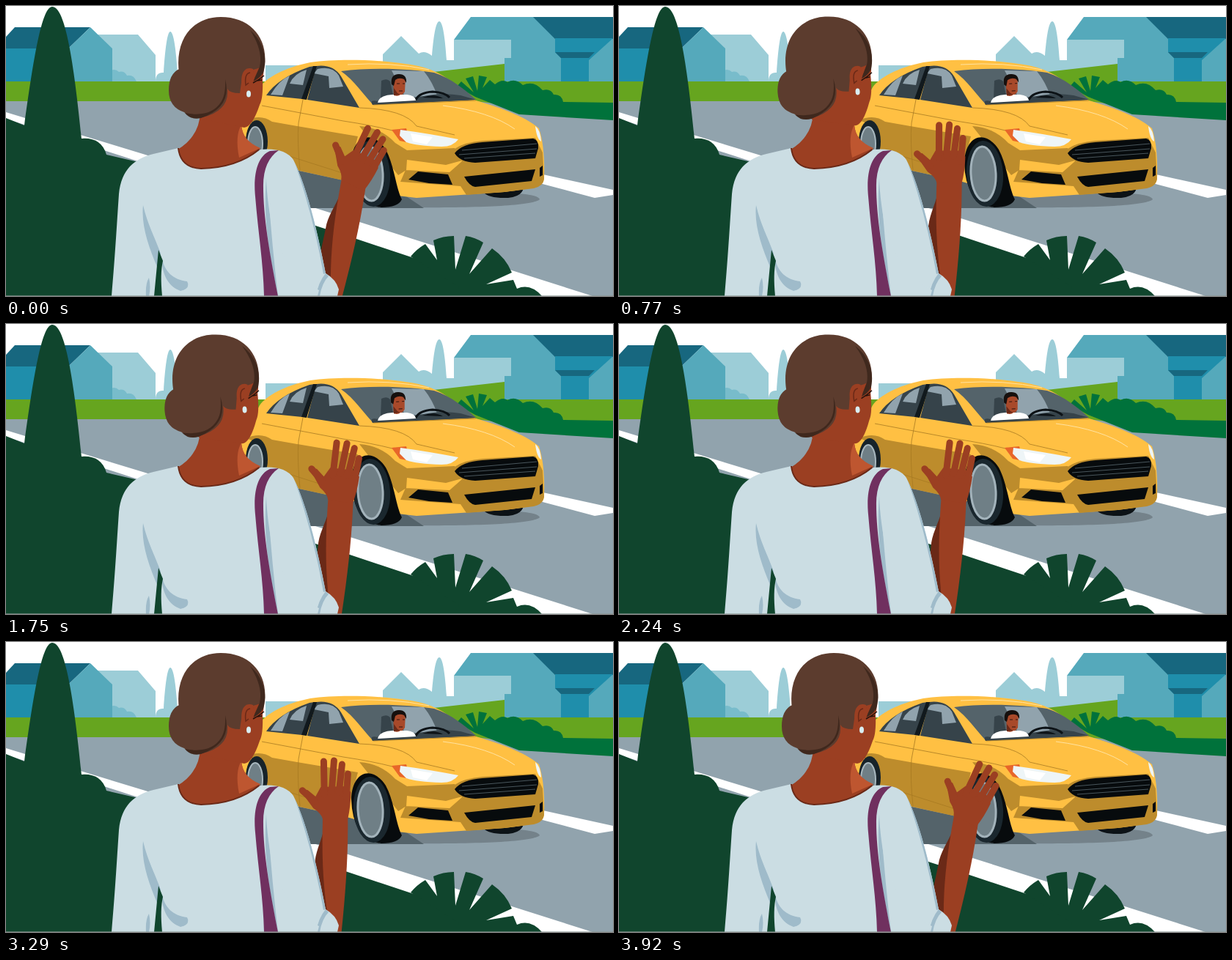
An HTML page for the animation above (3990 ms loop, 828 by 396 pixels).

```html
<!DOCTYPE html>
<html lang="en">
<head>
<meta charset="utf-8">
<title>Waving at a car</title>
<style>
html, body { margin: 0; width: 828px; height: 396px; overflow: hidden; background: #fff; }
svg { display: block; }
.pale { fill: #9ccdd7; } .blue { fill: #55a9bb; } .teal { fill: #1f8eab; } .navy { fill: #17677f; }
.lawn { fill: #66a51f; } .bush { fill: #00723b; } .dark { fill: #10452d; } .road { fill: #91a3ad; }
.car { fill: #ffc043; } .shade { fill: #bd8c2c; } .slate { fill: #54636a; } .ink { fill: #36434a; }
.skin { fill: #9b3f22; } .umber { fill: #6a2917; } .hair { fill: #5c3c2e; } .deep { fill: #3f281d; }
.cloth { fill: #cbdde3; } .fold { fill: #9fbbca; }
.line { fill: none; stroke: #a87a22; stroke-width: .8; }
.fingers { fill: none; stroke: #9b3f22; stroke-width: 9; stroke-linecap: round; stroke-linejoin: round; }
</style>
</head>
<body>
<svg width="828" height="396" viewBox="0 0 828 396">
  <g id="houses">
    <path class="pale" d="M115 39H180L204 67V103H140ZM204 103Q204 90 215 91C217 60 220 35 224 35C229 35 232 62 234 91Q245 92 246 103ZM354 81H425V105H354ZM514 92V66L539 41L563 65Q571 60 581 68C583 44 586 21 591 21C596 21 599 45 601 74H611V46H689V92Z"/>
    <path fill="#78bccb" d="M143 103V88Q149 85 154 90Q161 88 165 95Q174 93 178 103Z"/>
    <path class="teal" d="M0 58H90V103H0Z"/>
    <path class="navy" d="M0 42L12 29H115L85 58H0Z"/>
    <path class="blue" d="M115 29L145 58V103H85V58ZM634 15H720L750 44H828V103H680V71H689V46H611Z"/>
    <path class="navy" d="M719 15H828V45H749Z"/>
    <path class="teal" d="M749 44H828L795 74V103H757V71L749 63Z"/>
    <path class="navy" d="M749 63H803L795 71H757Z"/>
  </g>
  <path class="lawn" d="M0 103H500L566 92L680 79V103H828V140H0Z"/>
  <path class="road" d="M0 130H640L828 152V396H0Z"/>
  <path class="bush" d="M640 124L615 110L621 103L638 118L627 99L637 96L643 116L645 95L656 97L650 112L660 101L667 107Q677 99 684 104Q695 98 705 108Q720 101 732 115Q743 112 747 121Q758 120 760 131L828 132V156L700 148Z"/>
  <path fill="#fff" d="M728 229L828 251V258L803 262L728 242ZM0 145L190 203L416 274L800 396H690L416 300L180 212L0 154Z"/>
  <path class="dark" d="M0 153L25 163C39 60 50 1 63 1C79 1 91 60 103 181Q130 179 137 203L180 213L416 298L466 314L562 346L700 396H0Z"/>
  <path class="dark" d="M618 384L552 342Q560 332 572 325L588 347L583 320Q596 314 611 314L613 360L627 314Q640 316 651 323L632 366L663 331Q682 344 690 364L655 380L692 374L697 386Q715 378 731 396H610Z"/>

  <g id="car">
    <path fill="#74828a" d="M530 258L650 255Q725 254 728 264C720 273 640 276 540 275Z"/>
    <path class="slate" d="M395 224L470 240L540 256L570 276H412Z"/>
    <path fill="#0c1216" d="M650 252Q655 263 685 262Q705 260 706 247Z"/>
    <path class="car" d="M318 170C325 150 336 130 346 111C355 98 380 84 415 77C450 72 505 73 545 79C577 83 594 92 616 109L641 129C668 137 706 149 727 167C733 185 735 210 734 236C733 246 720 249 680 254L560 262L534 259L465 239L325 205Z"/>
    <path class="shade" d="M327 156Q348 147 363 158L397 164L480 178L464 239L400 225L354 200Q360 165 327 156ZM482 164Q512 166 531 187L547 197L612 194L622 211L600 217L547 210L546 224L535 231ZM612 195Q625 186 650 184L722 180L732 200L734 236Q733 246 720 249L680 254L628 258L620 246L538 240L545 224L605 227L622 212Z"/>
    <path class="ink" d="M355 122Q371 98 414 83L421 82L404 127ZM423 82Q446 79 457 96L482 139L411 128Z"/>
    <path class="road" d="M361 121Q373 101 387 95L377 122ZM387 106Q393 92 410 87L405 108ZM425 86Q445 81 454 95L460 110L441 112L440 96L420 92Z"/>
    <path fill="#11191d" d="M403 127L419 82H424L410 128Z"/>
    <path class="slate" d="M457 89C500 83 555 86 584 91C608 99 627 115 641 128L501 135C488 122 475 101 457 89Z"/>
    <path class="road" d="M526 88L570 89Q582 104 588 122L545 125Z"/>
    <path class="ink" d="M512 102Q520 98 524 103L528 122L511 127ZM500 135Q495 127 508 130L556 126Q590 117 620 122L641 128Z"/>
    <path d="M559 128Q564 118 582 117Q599 118 605 125" fill="none" stroke="#0c1216" stroke-width="3"/>
    <path fill="#0c1216" d="M568 125Q584 119 596 126Z"/>
    <path fill="#fff" d="M507 132Q509 122 527 121H547Q558 122 559 129Z"/>
    <g id="driver">
      <path fill="#a8492a" d="M528 98H545L544 117Q541 122 538 121Q535 124 529 122Z"/>
      <path class="umber" d="M529 112L534 119L538 121L529 122Z"/>
      <path fill="#16100e" d="M526 107Q524 93 536 93Q547 93 546 105L543 100Q536 97 531 101L529 109Z"/>
      <path d="M533 106h4m4 0h3M536 116h5" stroke="#32150e" fill="none"/>
    </g>
    <path class="line" d="M349 136L460 157Q500 163 527 170M405 128L399 160Q397 185 401 224M358 196L465 230M482 139Q544 141 560 164M501 135L641 129M560 164L612 176"/>
    <path d="M596 136Q660 144 694 168M466 80Q525 76 577 87" fill="none" stroke="#ffe3a1"/>
    <path fill="#e7662a" d="M526 169L546 167L551 187L537 184Z"/>
    <path fill="#eef5f7" d="M538 169Q575 174 617 182Q610 192 594 192Q560 191 546 186L537 177ZM722 164Q729 169 730 185Q724 182 722 164Z"/>
    <path fill="#fff" d="M552 174L582 179L574 189L555 185Z"/>
    <path fill="#070b0d" d="M612 201Q622 188 650 186L719 181Q727 183 726 194L722 208L640 214Q619 213 612 201ZM625 233L722 223L717 239L640 247Q632 246 625 233ZM549 237L562 226L603 230L609 244L577 242ZM728 221L732 218V231L728 233Z"/>
    <path d="M622 197L724 188M618 203L724 195M625 208L722 201" fill="none" stroke="#49565c"/>
    <ellipse cx="342" cy="185" rx="15" ry="29" fill="#17232a"/>
    <ellipse cx="340" cy="188" rx="10" ry="23" fill="#6f7f86" stroke="#a9b8bf" stroke-width="2"/>
    <path fill="#070b0d" d="M471 215C472 176 500 168 518 196C530 218 532 250 540 264Q535 275 512 275Q473 270 471 215Z"/>
    <ellipse cx="499" cy="229" rx="25" ry="45" fill="#1a272e" transform="rotate(-4 499 229)"/>
    <ellipse cx="497" cy="229" rx="17" ry="37" fill="#6f7f86" stroke="#a3b3bb" stroke-width="3" transform="rotate(-3 497 229)"/>
  </g>

  <g id="forearm">
    <path class="umber" d="M434 254C429 275 421 288 421 306L419 342L436 380L449 396L444 300Z"/>
    <path class="skin" d="M432 236H466C467 290 463 345 457 402H444C433 350 430 300 432 236Z"/>
    <g id="hand">
      <path class="skin" d="M432 242Q430 234 419 227L402 204L411 202L422 211L429 198L464 197L470 205Q470 225 466 242Z"/>
      <path class="fingers" d="M422 219L404 203M434 208L433 163M444 204L447 162M454 205L458 167M464 212L466 180"/>
    </g>
  </g>

  <path class="skin" d="M265 145Q264 178 234 196Q236 222 265 224Q318 222 347 195Q322 184 321 162L320 140Z"/>
  <path fill="#be5630" d="M321 162Q312 178 318 207L347 194Q322 184 321 162Z"/>
  <g id="head">
    <path class="skin" d="M300 75L351 70Q353 88 350 99Q351 126 346 135Q336 165 325 166L266 154Z"/>
    <path class="hair" d="M236 91C230 45 255 15 293 15C333 15 357 43 353 80Q347 85 337 87Q327 82 322 98L319 119Q305 119 302 113Q305 143 268 152Q254 156 243 145Q222 138 222 115Q222 93 236 86Z"/>
    <path class="deep" d="M333 33C354 51 356 75 351 91Q346 99 337 103L346 83Q351 61 333 33ZM299 100Q309 138 266 153Q252 156 244 146Q280 153 294 130Q300 120 299 100Z"/>
    <path class="skin" d="M337 86C325 81 319 94 322 108Q325 119 333 117L339 98Z"/>
    <path d="M333 91Q325 92 327 108L331 105" fill="none" stroke="#6a2917" stroke-width="1.5"/>
    <path d="M337 105Q345 101 352 95M342 102L349 101" fill="none" stroke="#24120c" stroke-width="1.5"/>
    <ellipse cx="331" cy="120" rx="3" ry="4.5" fill="#d9eef2"/>
  </g>

  <path class="cloth" d="M144 396C149 340 152 285 154 257C157 224 175 208 201 202L235 194Q238 221 266 222Q315 221 347 196Q380 193 392 210C408 242 423 298 436 365Q450 373 454 387L452 396Z"/>
  <path d="M235 194Q238 221 266 222Q315 221 345 196" fill="none" stroke="#6a2917" stroke-width="2"/>
  <path class="fold" d="M187 272C193 298 203 316 211 338L206 356C195 330 184 300 187 272ZM213 345C216 362 228 374 247 376Q252 386 238 389C222 384 212 366 213 345ZM191 396Q190 379 195 371Q198 384 195 396ZM355 235C356 270 365 330 383 357Q407 386 425 392L422 396H371C362 350 350 300 355 235ZM394 214C409 246 423 298 436 365L433 366Q420 290 394 214ZM436 365Q426 377 423 396H428Q431 378 440 369Z"/>
  <path class="cloth" d="M356 230C360 275 367 327 386 352Q409 380 427 388L425 396H371Q362 320 356 230Z"/>
  <path class="dark" d="M202 396L208 333L214 348Q210 365 213 396Z"/>
  <path fill="#70305f" d="M360 198C343 205 337 230 340 260C344 310 351 350 352 396H371C361 345 351 290 351 248Q350 212 372 197Z"/>
  <path fill="#8c9c98" opacity=".6" d="M0 395H828V396H0Z"/>
</svg>
<script>
const LOOP = 3990, STEP = 70, WAVE = LOOP / 3;
const byId = id => document.getElementById(id);
const [forearm, hand, head, driver] = ['forearm', 'hand', 'head', 'driver'].map(byId);

const ease = (t, from, to) => {
  const p = Math.min(1, Math.max(0, (t - from) / (to - from)));
  return (1 - Math.cos(Math.PI * p)) / 2;
};
const turn = (el, angle, x, y) => el.setAttribute('transform', `rotate(${angle} ${x} ${y})`);

function draw(now) {
  const t = Math.floor(now % LOOP / STEP) * STEP;
  const lean = (1 + Math.cos(2 * Math.PI * t / WAVE)) / 2;
  const away = ease(t, 70, 720) - ease(t, 2500, 3170);
  turn(forearm, 9 * lean, 440, 400);
  turn(hand, 17.5 * lean, 449, 238);
  turn(head, -3.6 * away, 280, 205);
  turn(driver, -3 * away, 536, 122);
  requestAnimationFrame(draw);
}
requestAnimationFrame(draw);
</script>
</body>
</html>
```
